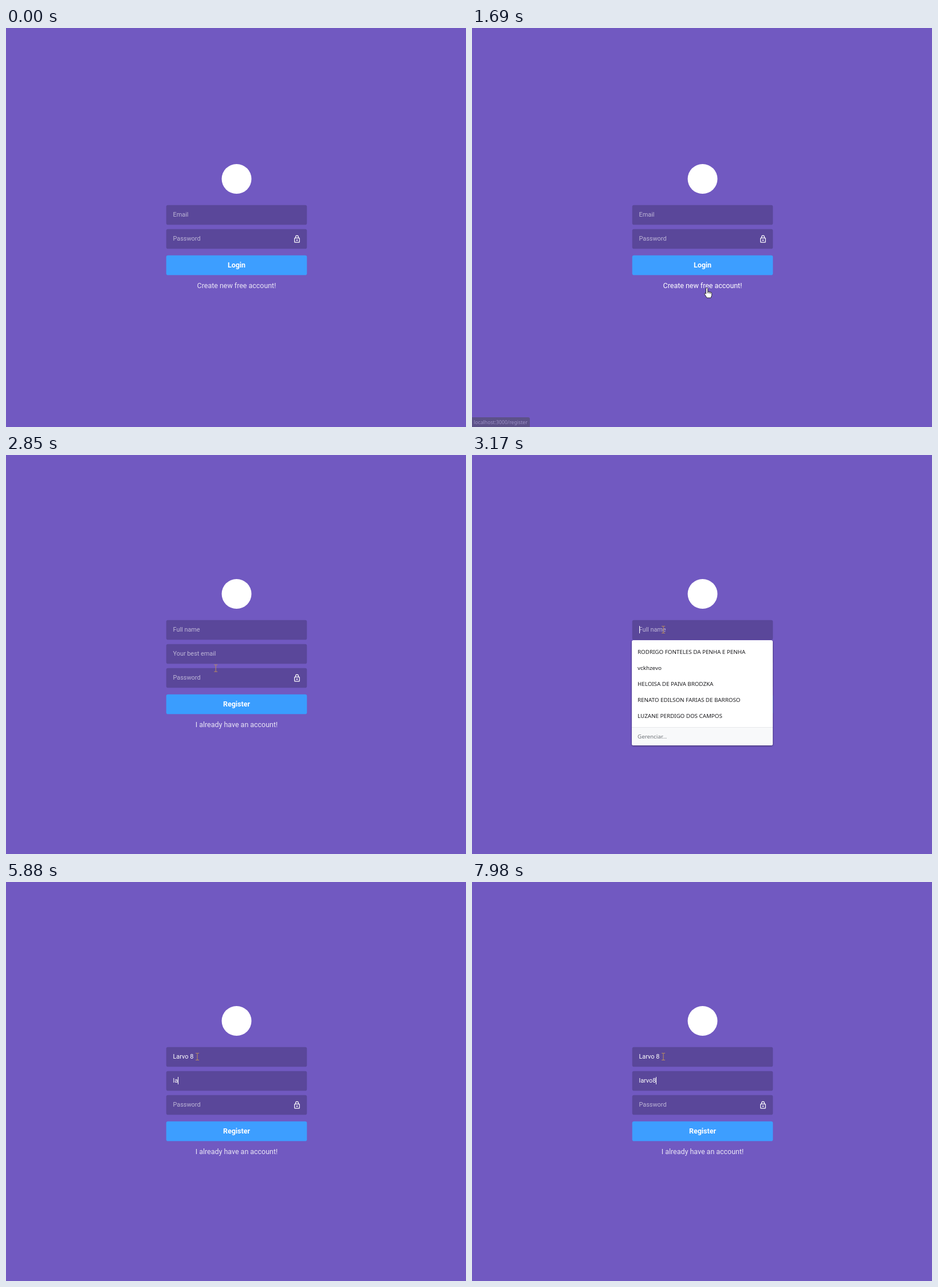
Write an HTML page that moves like this. It is 803x698 px and loops after 8000 ms.

```html
<!DOCTYPE html>
<html lang="en">
<head>
<meta charset="utf-8">
<title>Sign up</title>
<style>
html, body { margin: 0; width: 100%; height: 100%; overflow: hidden; background: #7159c1; }
svg { display: block; width: 803px; height: 698px; font: 10.89px Roboto, sans-serif; fill: #fff; }
.hint { opacity: .6; }
.big { font-size: 12.44px; text-anchor: middle; }
.bold { font-weight: 700; }
.list { font: 9.8px "Noto Sans", "Open Sans", sans-serif; fill: #1c1c1f; }
.panel { fill: #fff; filter: drop-shadow(0 1px 1.5px rgba(0, 0, 0, .45)); }
.status { font: 8.7px "Noto Sans", "Open Sans", sans-serif; }
</style>
</head>
<body>
<svg viewBox="0 0 803 698"></svg>
<script>
const LOOP = 8000, FIELD_W = 245, FIELD_H = 34, MID = 402.5;
const svg = document.querySelector('svg');
const pen = document.createElement('canvas').getContext('2d');

const pages = [
  { top: 310, hints: ['Email', 'Password'], button: 'Login', link: 'Create new free account!', linkW: 138 },
  { top: 289, hints: ['Full name', 'Your best email', 'Password'], button: 'Register', link: 'I already have an account!', linkW: 144 }
];
for (const p of pages) p.buttonY = p.top + 42 * p.hints.length + 4;

const people = ['RODRIGO FONTELES DA PENHA E PENHA', 'vckhzevo', 'HELOISA DE PAIVA BRODZKA',
  'RENATO EDILSON FARIAS DE BARROSO', 'LUZANE PERDIGO DOS CAMPOS'];
const spaced = ['Larvo 6', 'Larvo Rodrigo'];
const matches = ['Larvo', ...spaced, 'larvo5', 'larvovo', 'Larvos'];
const emails = ['larvo5@larvo.com', 'larvo@larvo.com', 'larvo6@larvo.com', 'larvo55@larvo.com',
  'larvo5@larvo.comvckhz', 'Larvo@larvo.com'];

// Each track holds [time, value]; a value lasts until the next one.
const nameTrack = [[0, ''], [3930, 'L'], [4020, 'La'], [4180, 'Lar'], [4260, 'Larv'], [4330, 'Larvo'],
  [4480, 'Larvo '], [4790, 'Larvo 8']];
const emailTrack = [[0, ''], [5800, 'l'], [5880, 'la'], [6260, 'l'], [6430, ''], [6900, 'l'], [6970, 'la'],
  [7130, 'lar'], [7280, 'larv'], [7370, 'larvo'], [7910, 'larvo8']];
const caretTrack = [[0, -1], [3170, 0], [3630, -1], [3930, 0], [5020, 1], [5570, -1], [5800, 1]];
const listTrack = [[0, null], [3170, people], [3930, matches], [4480, spaced], [4790, null], [6900, emails], [7910, null]];
const at = (track, t) => track.findLast(k => k[0] <= t)[1];

// Pointer path: time, x, y
const path = [[70, 706, 686], [230, 640, 610], [380, 545, 510], [530, 466, 458], [690, 462, 448], [830, 474, 417],
  [975, 474, 421], [1070, 468, 402], [1140, 455, 385], [1220, 437, 384], [1300, 425, 405], [1380, 415, 437],
  [1450, 412, 457], [1510, 410, 455], [2600, 410, 455], [2760, 378, 400], [2900, 342, 318], [3000, 334, 305.5]];

function pointer(time) {
  const t = Math.floor((time - 70) / 76) * 76 + 70;
  const i = path.findIndex(k => k[0] > t);
  if (i < 0) return path.at(-1).slice(1);
  if (i === 0) return [900, 900];
  const [a, b] = [path[i - 1], path[i]], f = (t - a[0]) / (b[0] - a[0]);
  return [a[1] + (b[1] - a[1]) * f, a[2] + (b[2] - a[2]) * f];
}

const pageAt = t => pages[t < 2390 ? 0 : 1];

function under(t) {
  const p = pageAt(t), [x, y] = pointer(t);
  const inside = (top, h, w) => Math.abs(x - MID) <= w / 2 && y >= top && y <= top + h;
  if (inside(p.buttonY, FIELD_H, FIELD_W)) return 'button';
  if (inside(p.buttonY + 45, 17, p.linkW)) return 'link';
  return p.hints.some((_, i) => inside(p.top + 42 * i, FIELD_H, FIELD_W)) ? 'field' : '';
}

// Share of the last 200 ms spent over a part: a linear hover transition.
function hover(part, t) {
  let n = 0;
  for (let k = 0; k < 10; k++) n += under(t - 20 * k) === part;
  return n / 10;
}

const rect = (x, y, w, h, attrs) => `<rect x="${x}" y="${y}" width="${w}" height="${h}" ${attrs}/>`;
const text = (x, y, s, attrs = '') => `<text x="${x}" y="${y}" ${attrs}>${s}</text>`;
const box = (y, fill) => rect(MID - FIELD_W / 2 - .3, y - .3, FIELD_W + .6, FIELD_H + .6, `rx="3.1" fill="${fill}"`);

const lock = y => `<path transform="translate(508 ${y}) scale(.61) translate(-12 -11.5)" d="M12 17a2 2 0 1 0 0-4 2 2 0 0 0 0 4zm6-9h-1V6A5 5 0 0 0 7 6v2H6a2 2 0 0 0-2 2v10a2 2 0 0 0 2 2h12a2 2 0 0 0 2-2V10a2 2 0 0 0-2-2zM8.9 6a3.1 3.1 0 0 1 6.2 0v2H8.9zM18 20H6V10h12z"/>`;

function field(y, hint, value, caret) {
  let s = box(y, '#5a479a') + text(291.5, y + 20, value || hint, value ? '' : 'class="hint"');
  if (hint === 'Password') s += lock(y + 17);
  if (caret) {
    pen.font = '10.89px Roboto, sans-serif';
    s += rect(Math.round(291.6 + pen.measureText(value).width), y + 10, 1, 13, '');
  }
  return s;
}

function list(items, top) {
  const body = 28 * items.length + 12, footer = items === people;
  let s = rect(279, top, 246, body + (footer ? 32 : 0), 'rx="3" class="panel"');
  items.forEach((item, i) => s += text(289, top + 24 + 28 * i, item));
  if (footer) s += `<path d="M279 ${top + body}h246v29q0 3-3 3h-240q-3 0-3-3z" fill="#f8f9fa"/>`
    + rect(279, top + body, 246, 1, 'fill="#e6e8ea"') + text(289, top + body + 20, 'Gerenciar...', 'fill="#70757a"');
  return `<g class="list">${s}</g>`;
}

function status(t) {
  if (t < 1690 || t >= 2620) return '';
  const y = t < 2460 ? 681 : t < 2540 ? 684 : 689;
  return `<g class="status" opacity="${t < 1760 ? .5 : 1}">`
    + `<path d="M0 ${y}h98q3 0 3 3v20H0z" fill="#494a50"/>`
    + text(3, y + 11.5, 'localhost:3000/register', 'fill="#c4c6ca"') + '</g>';
}

function cursor(t) {
  const [x, y] = pointer(t), part = under(t);
  const shape = part === 'field'
    ? '<path d="M-3-6h2.2L0-5.3.8-6H3M0-5.3V5.3M-3 6h2.2L0 5.3.8 6H3" fill="none" stroke="#b58a62" stroke-width="1.1"/>'
    : part
    ? '<path d="M-1.5 1a1.5 1.5 0 0 1 3 0v5l5 1q2 .5 2 2.5v3L7 17H0l-4-6.5q-.5-2 1.2-1.5l1.3 1zM1.5 6v3M4 7v2.5M6.3 7.5V10" stroke="#222" stroke-width=".9" stroke-linejoin="round"/>'
    : '<path d="M0 0v12.5l3-2.7L5 14l2-.8L5.1 9H9z" stroke="#222" stroke-width=".9"/>';
  return `<g transform="translate(${x} ${y})">${shape}</g>`;
}

function draw(t) {
  const p = pageAt(t), by = p.buttonY, h = hover('button', t);
  const values = p === pages[1] ? [at(nameTrack, t), at(emailTrack, t)] : [];
  const caret = at(caretTrack, t), items = at(listTrack, t);
  return `<circle cx="${MID}" cy="${p.top - 46}" r="26"/>`
    + p.hints.map((hint, i) => field(p.top + 42 * i, hint, values[i] || '', caret === i)).join('')
    + box(by, `rgb(${61 - 10 * h},${158 - 5 * h},${255 - 3 * h})`)
    + text(MID, by + 20.6, p.button, 'class="big bold"')
    + text(MID, by + 57, p.link, `class="big" opacity="${.85 + .15 * hover('link', t)}"`)
    + (items ? list(items, items === emails ? 366 : 324) : '')
    + status(t) + cursor(t);
}

let shown;
function tick() {
  const next = draw(performance.now() % LOOP);
  if (next !== shown) svg.innerHTML = shown = next;
  requestAnimationFrame(tick);
}
tick();
</script>
</body>
</html>
```
